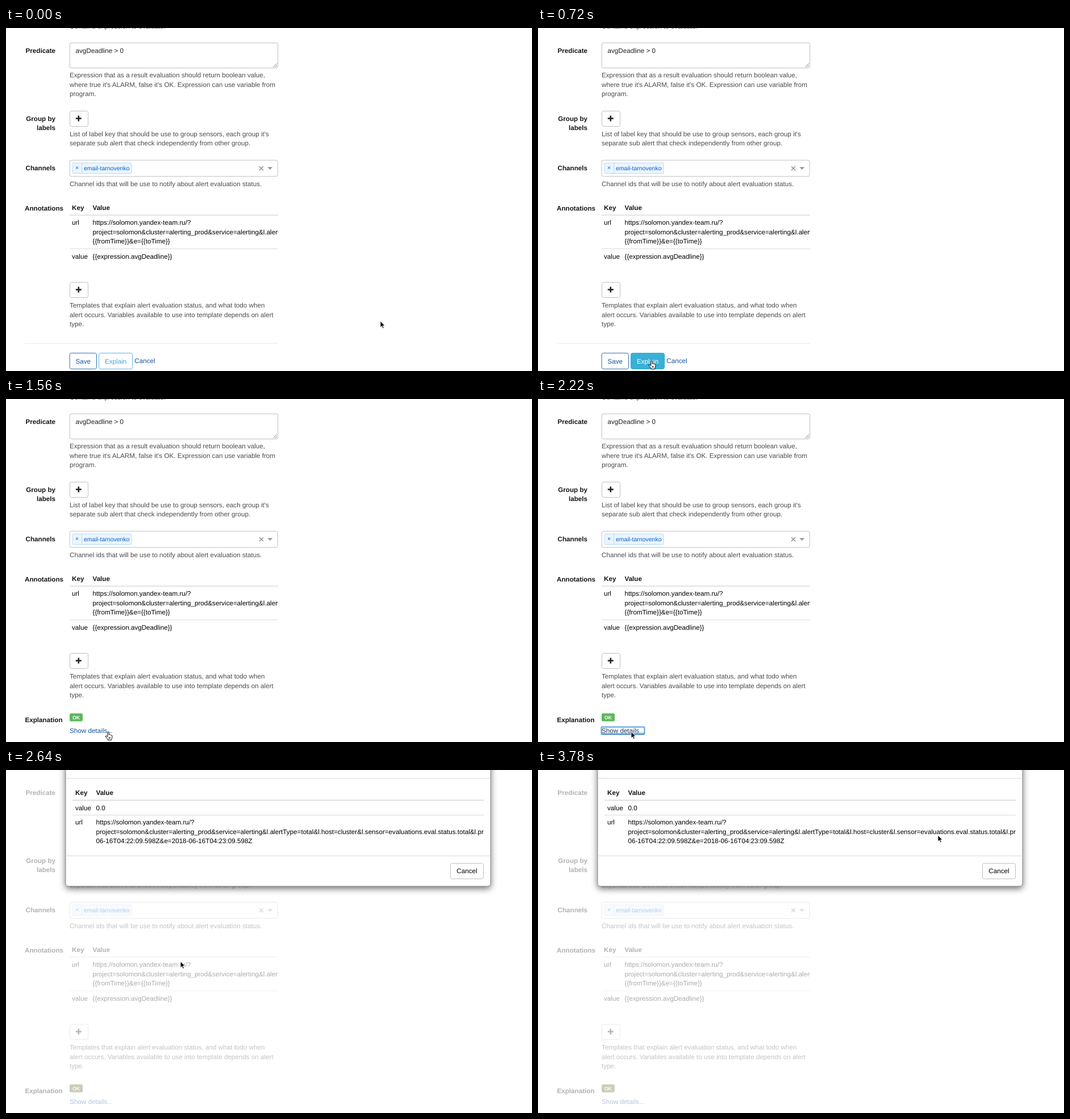
Write an HTML page that moves like this. It is 926 px wide and 605 px high and loops after 3840 ms.

```html
<!DOCTYPE html>
<html lang="en">
<head>
<meta charset="utf-8">
<title>Alert form</title>
<style>
  html, body { margin: 0; width: 100%; height: 100%; overflow: hidden; background: #fff; }
  svg { display: block; }
  text { font: 11.67px "Liberation Sans", Arial, sans-serif; fill: #000; text-rendering: geometricPrecision; white-space: pre; transform: translateY(-.5px); }
  .label, .head { font-weight: bold; fill: #161616; }
  .label { text-anchor: end; }
  .help { fill: #4c4c4c; }
  .mid { text-anchor: middle; }
  .box { fill: #fff; stroke: #bfbfbf; }
  .rule { stroke: #dadada; fill: none; }
  .link { fill: #16559a; }
  #tag text { font-size: 10.5px; fill: #0560cc; }
  #save { stroke: #2f70b0; }
  #explain rect { stroke: #5bb5e0; }
  #explain text { fill: #46a3da; }
  #explain.hover rect { fill: #39b0d6; stroke: #2fa5cc; }
  #explain.hover text { fill: #fff; }
  #badge { fill: #5cb85c; }
  .dim #badge { fill: #5f6c23; }
  #details.hover text { fill: #173c63; text-decoration: underline; }
  #ring { fill: none; stroke: #5a9fe0; stroke-width: 2; }
  #dialog { filter: drop-shadow(0 4px 6px rgba(0, 0, 0, .55)); }
</style>
</head>
<body>
<svg id="stage" width="926" height="605" viewBox="0 0 926 605">
  <defs>
    <g id="add">
      <rect class="box" x=".5" y=".5" width="32" height="27" rx="3"/>
      <path d="M15.8 8.5v10M10.8 13.5h10" stroke="#222" stroke-width="2.6"/>
    </g>
  </defs>

  <text class="help" x="112" y="1">Contains expression to evaluate.</text>

  <text class="label" x="87" y="44">Predicate</text>
  <rect class="box" x="112.2" y="26.2" width="366.5" height="44.3" rx="3"/>
  <path d="M470.5 69l6.5-6.5M474 69l3-3" stroke="#777"/>
  <text x="122.5" y="44" style="fill:#222">avgDeadline &gt; 0</text>
  <text class="help" y="87.5"><tspan x="112">Expression that as a result evaluation should return boolean value,</tspan><tspan x="112" dy="16.67">where true it's ALARM, false it's OK. Expression can use variable from</tspan><tspan x="112" dy="16.67">program.</tspan></text>

  <text class="label" y="164"><tspan x="87">Group by</tspan><tspan x="87" dy="16.67">labels</tspan></text>
  <use href="#add" x="112" y="146"/>
  <text class="help" y="191"><tspan x="112">List of label key that should be use to group sensors, each group it's</tspan><tspan x="112" dy="16.67">separate sub alert that check independently from other group.</tspan></text>

  <text class="label" x="87" y="251">Channels</text>
  <rect class="box" x="112.2" y="233.2" width="366" height="28.6" rx="3"/>
  <g id="tag">
    <rect x="117" y="238" width="104" height="18.5" rx="1.5" fill="#ebf5ff" stroke="#b9dbfb"/>
    <path d="M133.5 238v18.5" stroke="#b9dbfb"/>
    <text class="mid" x="125" y="250.8">×</text>
    <text x="137" y="251.3">email-tarnovenko</text>
  </g>
  <path d="M446 244l7 7M453 244l-7 7" stroke="#8a8a8a" stroke-width="1.4"/>
  <path d="M460.3 245.3h9l-4.5 4.6z" fill="#999"/>
  <text class="help" x="112" y="279">Channel ids that will be use to notify about alert evaluation status.</text>

  <text class="label" x="101" y="322.5">Annotations</text>
  <text class="head" x="116" y="321">Key</text>
  <text class="head" x="152.5" y="321">Value</text>
  <path class="rule" d="M112 330h367" stroke-width="1.7"/>
  <path class="rule" d="M112 389.5h367"/>
  <svg width="479" height="605">
    <text x="116" y="347.5">url</text>
    <text y="347.5"><tspan x="152.5">https://solomon.yandex-team.ru/?</tspan><tspan x="152.5" dy="16.67">project=solomon&amp;cluster=alerting_prod&amp;service=alerting&amp;l.alertType=total</tspan><tspan x="152.5" dy="16.67">{{fromTime}}&amp;e={{toTime}}</tspan></text>
    <text x="116" y="407">value</text>
    <text x="152.5" y="407">{{expression.avgDeadline}}</text>
  </svg>
  <use href="#add" x="112" y="448"/>
  <text class="help" y="493.5"><tspan x="112">Templates that explain alert evaluation status, and what todo when</tspan><tspan x="112" dy="16.67">alert occurs. Variables available to use into template depends on alert</tspan><tspan x="112" dy="16.67">type.</tspan></text>

  <g id="actions">
    <path d="M33 556.3h446" stroke="#e9e9e9"/>
    <rect class="box" id="save" x="112.2" y="573.4" width="47.3" height="28" rx="3"/>
    <text class="mid link" x="135.8" y="592">Save</text>
    <g id="explain">
      <rect class="box" x="163.6" y="573.4" width="59" height="28" rx="3"/>
      <text class="mid" x="193.1" y="592">Explain</text>
    </g>
    <text class="link" x="226.3" y="591.3">Cancel</text>
  </g>

  <g id="explanation">
    <text class="label" x="99.5" y="570.3">Explanation</text>
    <rect id="badge" x="112" y="554.5" width="23" height="14" rx="2.5"/>
    <text class="mid" x="123.5" y="565" style="font-size:8.75px;font-weight:bold;fill:#fff">OK</text>
    <g id="details"><text class="link" x="112" y="589.5">Show details...</text></g>
    <rect id="ring" x="111.5" y="578.5" width="76" height="13" rx="1.5"/>
  </g>

  <g id="modal">
    <rect width="926" height="605" fill="#fff" opacity=".67"/>
    <rect id="dialog" x="105" y="-20" width="748" height="225" rx="5" fill="#fff" stroke="#8c8c8c"/>
    <path class="rule" d="M105.5 14.5h747M105.5 151.5h747M117 79.5h724"/>
    <path class="rule" d="M117 53.3h724" stroke-width="1.7"/>
    <text class="head" x="122" y="44">Key</text>
    <text class="head" x="158.5" y="44">Value</text>
    <svg width="841" height="605">
      <text x="122" y="71">value</text>
      <text x="158.5" y="71">0.0</text>
      <text x="122" y="96.5">url</text>
      <text y="96.5"><tspan x="158.5">https://solomon.yandex-team.ru/?</tspan><tspan x="158.5" dy="16.67">project=solomon&amp;cluster=alerting_prod&amp;service=alerting&amp;l.alertType=total&amp;l.host=cluster&amp;l.sensor=evaluations.eval.status.total&amp;l.project</tspan><tspan x="158.5" dy="16.67">06-16T04:22:09.598Z&amp;e=2018-06-16T04:23:09.598Z</tspan></text>
    </svg>
    <rect class="box" x="782.5" y="164.5" width="58" height="27.5" rx="3"/>
    <text class="mid" x="811.5" y="182.8">Cancel</text>
  </g>

  <g id="cursor">
    <path id="arrow" d="M0 0V11.2L2.6 8.8L4.4 12.9L6.3 12L4.5 8.1H8z" fill="#000" stroke="#fff" stroke-width=".9"/>
    <path id="hand" d="M-1.2 8V1.2Q-1.2 0 0 0T1.2 1.2V5Q2.6 4.4 3.3 5.4Q4.6 4.9 5.2 6Q6.9 5.8 6.9 7.3V9.5Q6.9 11.5 5.7 13V14.6H-.8V13.2L-4.6 8.9Q-5.2 7.6 -4 7.1Q-3.2 6.8 -1.2 8.8zM1.3 9.3V12.3M3.2 9.3V12.3" fill="#fff" stroke="#000"/>
  </g>
</svg>

<script>
const LOOP = 3840, STEP = 60;
const HOVER = 420, EXPLAINED = 1020, LINK = 1800, FOCUS = 2100, ARROW = 2220, MODAL = 2280;
// Pointer path: time, x, y
const path = [
  [0, 659, 517], [240, 450, 545], [420, 222, 588], [540, 200, 587], [1140, 200, 587],
  [1560, 180, 587], [2100, 164, 587], [2280, 164, 587], [2700, 331, 296],
  [3120, 561, 203], [3240, 571, 150], [3480, 640, 118], [3780, 704, 115]
];
const el = id => document.getElementById(id);
const show = (id, on) => el(id).style.display = on ? '' : 'none';

function pointer(t) {
  const i = path.findIndex(p => p[0] >= t);
  if (i === 0) return path[0].slice(1);
  const [t0, x0, y0] = path[i - 1], [t1, x1, y1] = path[i];
  const k = (t - t0) / (t1 - t0);
  return [x0 + (x1 - x0) * k, y0 + (y1 - y0) * k];
}

function draw(now) {
  const t = Math.floor(now % LOOP / STEP) * STEP;
  const modal = t >= MODAL, hand = t >= HOVER && t < ARROW;
  show('actions', t < EXPLAINED);
  show('explanation', t >= EXPLAINED);
  show('ring', t >= FOCUS && !modal);
  show('modal', modal);
  show('hand', hand);
  show('arrow', !hand);
  el('explain').classList.toggle('hover', t >= HOVER);
  el('details').classList.toggle('hover', t >= LINK && !modal);
  el('stage').classList.toggle('dim', modal);
  el('cursor').setAttribute('transform', `translate(${pointer(t)})`);
}

const start = performance.now();
function tick() {
  draw(performance.now() - start);
  requestAnimationFrame(tick);
}
tick();
</script>
</body>
</html>
```
